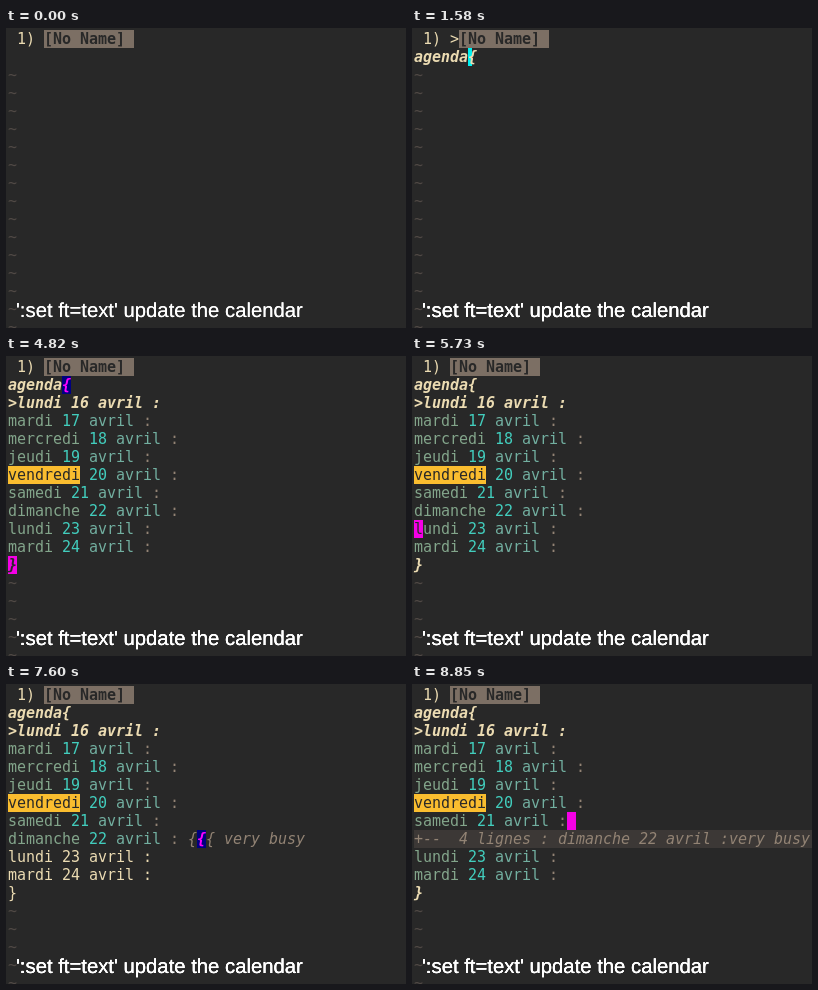
Recreate the animation shown at these times as an HTML page. Size 400 by 300 pixels, loop 9.8 s.

```html
<!DOCTYPE html>
<html lang="en">
<head>
<meta charset="utf-8">
<title>Calendar update in an editor</title>
<style>
  html, body { margin: 0; width: 100%; height: 100%; overflow: hidden; background: #282828; }
  #stage { position: relative; width: 400px; height: 300px; overflow: hidden; background: #282828; }
  #screen span {
    position: absolute; height: 18px; white-space: pre;
    font: 15px/18px "DejaVu Sans Mono", monospace; letter-spacing: -.031px; color: #ebdbb2;
  }
  #screen .strong { font-weight: bold; font-style: italic; }
  #screen .tilde { color: #504945; }
  #screen .tab { color: #282828; background: #7c6f64; font-weight: bold; }
  #screen .day { color: #83a58b; }
  #screen .num { color: #42cdbd; }
  #screen .month { color: #72afa0; }
  #screen .dim { color: #928374; }
  #screen .today { color: #282828; background: #fabd2f; }
  #screen .note { color: #928374; font-style: italic; }
  #screen .fold { color: #928374; background: #3c3836; font-style: italic; padding-right: 2px; }
  #screen .match { color: #ff00ff; background: #000080; font-weight: bold; }
  #screen .block { color: #282828; background: #f500e6; }
  #screen .bar { width: 4px; background: #00f0f0; }
  #caption {
    position: absolute; left: 10px; top: 272px; white-space: pre; text-rendering: geometricPrecision;
    font: 20.3px/23px "Liberation Sans", Arial, sans-serif; color: #fff; text-shadow: 0 0 #fff;
  }
  #caption b { font-weight: normal; }
  #caption.heavy { text-shadow: 0 0 #fff, 0 0 #fff; }
  #caption.heavy b { text-shadow: 0 0 #fff, 0 0 #fff, 0 0 #fff, 0 0 #fff; }
</style>
</head>
<body>
<div id="stage">
  <div id="screen"></div>
  <div id="caption"><b>':</b>set ft=text' update the calendar</div>
</div>
<script>
const LOOP = 9800, CELL = 9, LINE = 18, PAD = 2, ROWS = 17;
const DAYS = ['mardi', 'mercredi', 'jeudi', 'vendredi', 'samedi', 'dimanche', 'lundi', 'mardi'];
const FOLD = '+--  4 lignes : dimanche 22 avril :very busy';
const screen = document.getElementById('screen');
const caption = document.getElementById('caption');

const bar = (row, col) => ({ kind: 'bar', row, col });
const block = (row, col) => ({ kind: 'block', row, col });

// Each step changes only the named parts of the state before it.
const steps = [[0, { head: '', rest: [], week: false, note: '', dirty: false, cursor: null, match: [], heavy: false }]];
const at = (time, change) => steps.push([time, change]);

const word = 'agenda';
[[170, 220], [370, 420], [520, 570], [670, 720], [840, 890], [990, 1050]].forEach(([key, move], i) => {
  at(key, { head: word.slice(0, i + 1), dirty: true, heavy: true });
  at(move, { cursor: bar(1, i + 1) });
});
at(1580, { head: 'agenda{' });
at(1630, { cursor: bar(1, 7) });
at(1880, { rest: [''] });
at(1930, { cursor: bar(2, 0) });
at(2180, { rest: ['}'] });
at(2230, { cursor: bar(2, 1), match: [[1, 6], [2, 0]] });
at(2480, { dirty: false });
at(2530, { cursor: block(2, 0) });
at(2890, { cursor: null });
at(4820, { week: true, cursor: block(11, 0), match: [[1, 6]] });
at(5500, { cursor: null, match: [] });
at(5560, { cursor: block(10, 0) });
at(5730, { cursor: block(9, 0) });
at(5890, { cursor: block(8, 0) });
at(6020, { cursor: block(8, 1) });
at(6560, { cursor: block(8, 19) });
at(7020, { note: 'all', cursor: block(8, 0) });
at(7600, { note: 'line', cursor: null, match: [[8, 21]] });
at(7660, { note: '   }}', cursor: bar(11, 5), match: [[8, 21], [11, 4]] });
at(8330, { note: '   }}}', match: [[8, 20], [11, 5]] });
at(8380, { cursor: bar(11, 6) });
at(8550, { cursor: null, match: [] });
at(8600, { cursor: block(11, 5), match: [[8, 20]] });
at(8750, { note: 'shut', cursor: block(8, 0), match: [] });
at(8800, { cursor: null });
at(8850, { cursor: block(7, 17) });

let last = {};
const states = steps.map(([, change]) => last = { ...last, ...change });

function weekLines(note) {
  const lines = [[['strong', '>lundi 16 avril :']]];
  const open = note && note !== 'shut';
  for (let i = 0; i < DAYS.length; i++) {
    const day = DAYS[i], num = 17 + i, noted = day === 'dimanche' && note;
    if (noted && (note === 'all' || note === 'shut')) {
      lines.push([['fold', FOLD]]);
      if (note === 'all') return lines;
      continue;
    }
    if (open && num > 22) {
      lines.push([['plain', `${day} ${num} avril :`]]);
      continue;
    }
    const line = [[day === 'vendredi' ? 'today' : 'day', day], ['num', ` ${num} `], ['month', 'avril'], ['dim', ' :']];
    if (noted) line.push(['note', ' {{{ very busy']);
    lines.push(line);
    if (noted && note !== 'line') lines.push([], [], [['note', note]]);
  }
  lines.push([[open ? 'plain' : 'strong', '}']]);
  return lines;
}

function screenLines(s) {
  const lines = [
    [['plain', s.dirty ? ' 1) >' : ' 1) '], ['tab', '[No Name] ']],
    [[s.head.includes('{') ? 'strong' : 'plain', s.head]],
    ...(s.week ? weekLines(s.note) : s.rest.map(text => [['strong', text]]))
  ];
  while (lines.length < ROWS) lines.push([['tilde', '~']]);
  return lines;
}

function put(row, col, style, text) {
  const span = document.createElement('span');
  span.className = style;
  span.textContent = text;
  span.style.left = PAD + col * CELL + 'px';
  span.style.top = PAD + row * LINE + 'px';
  if (text) span.style.width = text.length * CELL + 'px';
  screen.append(span);
}

function draw(s) {
  const grid = screenLines(s).map(line =>
    line.flatMap(([style, text]) => [...text].map(ch => ({ ch, style }))));
  const mark = (row, col, style) => {
    const cell = grid[row][col] ||= { ch: ' ', style: 'plain' };
    cell.style += ' ' + style;
  };
  screen.replaceChildren();
  for (const [row, col] of s.match) mark(row, col, 'match');
  const c = s.cursor;
  if (c && c.kind === 'bar') put(c.row, c.col, 'bar', '');
  else if (c) mark(c.row, c.col, 'block');

  // Neighbouring cells of one style become one run of text.
  grid.forEach((cells, row) => {
    for (let from = 0, to; from < cells.length; from = to) {
      const style = cells[from].style;
      for (to = from; to < cells.length && cells[to].style === style;) to++;
      put(row, from, style, cells.slice(from, to).map(cell => cell.ch).join(''));
    }
  });
  caption.classList.toggle('heavy', s.heavy);
}

let shown = -1;
function tick() {
  const time = performance.now() % LOOP;
  const index = steps.filter(([start]) => start <= time).length - 1;
  if (index !== shown) draw(states[shown = index]);
  requestAnimationFrame(tick);
}
tick();
</script>
</body>
</html>
```
